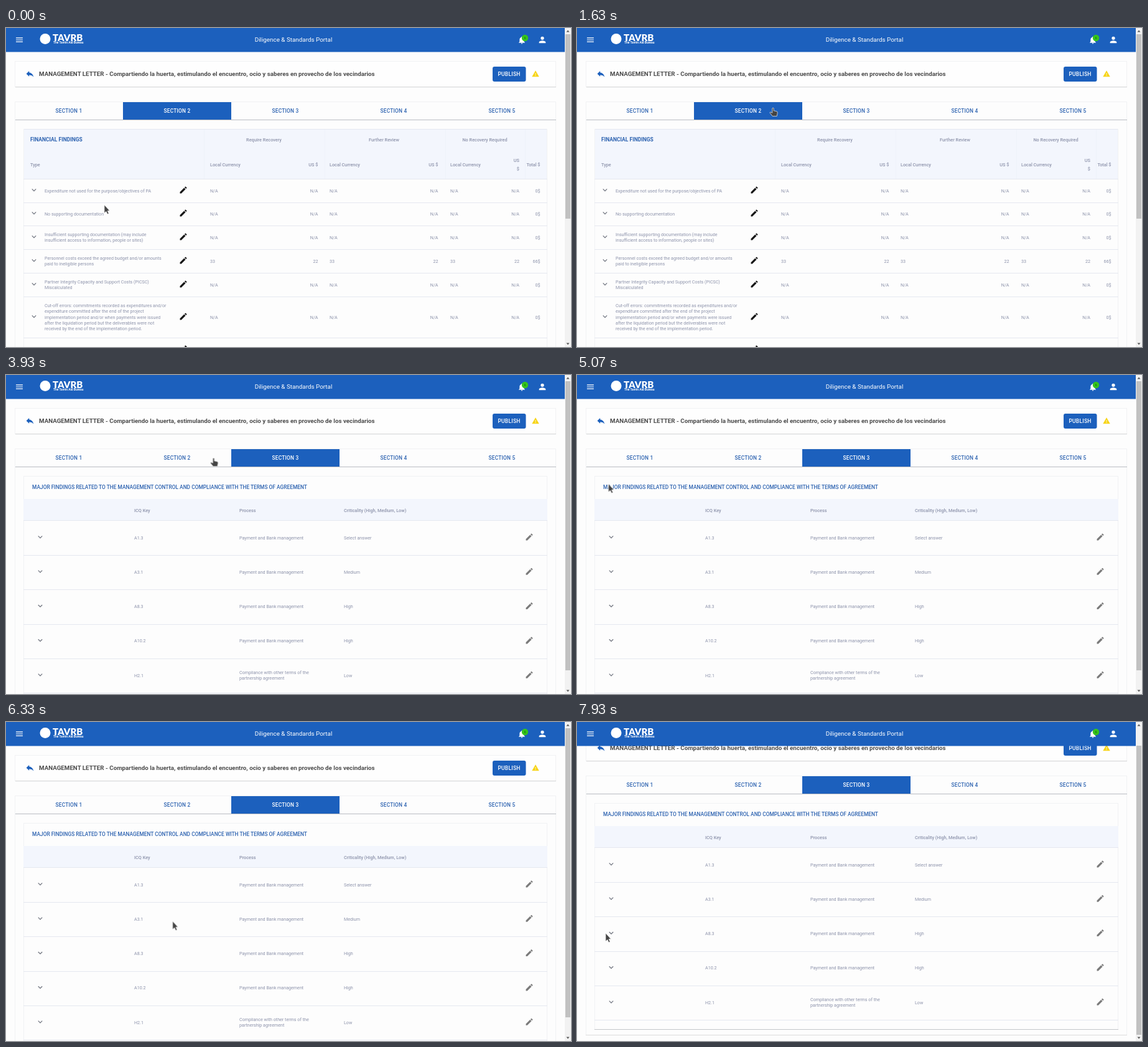
An HTML page for the animation above (8 s loop, 908x512 px).

```html
<!DOCTYPE html>
<html lang="en">
<head>
<meta charset="utf-8">
<title>Management letter</title>
<style>
html, body { margin: 0; width: 100%; height: 100%; overflow: hidden; background: #fdfdfd; }
svg { display: block; width: 908px; height: 512px; font-family: Roboto, sans-serif; }
.page, .thumb, .cursor, .ripple { animation: 8s linear infinite; }
.before, .after, .arrow, .hand, .pressed { animation: 8s step-end infinite; }
.page { animation-name: scroll; }
.thumb { animation-name: thumb; }
.cursor { animation-name: move; }
.before { animation-name: leave; }
.after { animation-name: enter; }
.arrow { animation-name: arrow; }
.hand { animation-name: hand; }
.pressed { animation-name: press; }
.ripple { animation-name: ripple; transform-origin: 412px 131px; }

@keyframes scroll {
  0%, 79.4% { transform: translateY(0); animation-timing-function: ease-in-out; }
  81.4%, 100% { transform: translateY(-32px); }
}
@keyframes thumb {
  0%, 79.4% { transform: translateY(0); animation-timing-function: ease-in-out; }
  81.4%, 100% { transform: translateY(28px); }
}
@keyframes leave { 0% { opacity: 1; } 38.75%, 100% { opacity: 0; } }
@keyframes enter { 0% { opacity: 0; } 38.75%, 100% { opacity: 1; } }
@keyframes arrow { 0% { opacity: 1; } 18.6% { opacity: 0; } 51%, 100% { opacity: 1; } }
@keyframes hand { 0% { opacity: 0; } 18.6% { opacity: 1; } 51%, 100% { opacity: 0; } }
@keyframes press { 0% { fill: #2c62b0; } 34%, 100% { fill: #1f5fd0; } }
@keyframes ripple {
  0%, 34% { transform: scale(0); }
  37.125% { transform: scale(.754); }
  40%, 100% { transform: scale(1); }
}
@keyframes move {
  0%, .375% { transform: translate(158px, 284px); }
  5% { transform: translate(118px, 330px); }
  10% { transform: translate(210px, 300px); }
  15% { transform: translate(280px, 200px); }
  19.2%, 21% { transform: translate(315px, 128px); }
  27.5%, 32.9% { transform: translate(340px, 130px); }
  34%, 43.4% { transform: translate(411px, 127px); }
  45.5% { transform: translate(425px, 131px); }
  49.125% { transform: translate(334px, 133px); }
  53.4% { transform: translate(205px, 160px); }
  58% { transform: translate(48px, 172px); }
  61% { transform: translate(72px, 186px); }
  64% { transform: translate(45px, 172px); }
  69% { transform: translate(345px, 168px); }
  74% { transform: translate(290px, 284px); }
  77.875% { transform: translate(269px, 318px); }
  82.875%, 85% { transform: translate(264px, 325px); }
  95.3% { transform: translate(82px, 346px); }
  97.3% { transform: translate(36px, 350px); }
  99.125%, 100% { transform: translate(46px, 339px); }
}
</style>
</head>
<body>
<svg id="stage" viewBox="0 0 908 512"></svg>
<script>
const BLUE = '#1c60bd', NAVY = '#2c62b0', LINE = '#e5e8f0', FAINT = '#f1f2f4', EDGE = '#dcdcdc';
const INK = '#8d93ab', ICON = '#70747f', HEAD = '#f3f6fd';
const CELL = 7.15, LABEL = 7.3;

const ICONS = {
  pencil: 'M3 17.25V21h3.75L17.81 9.94l-3.75-3.75zM20.71 7.04a1 1 0 0 0 0-1.41l-2.34-2.34a1 1 0 0 0-1.41 0l-1.83 1.83 3.75 3.75z',
  chevron: 'M16.59 8.59L12 13.17 7.41 8.59 6 10l6 6 6-6z',
  reply: 'M10 9V5l-7 7 7 7v-4.1c5 0 8.5 1.6 11 5.1-1-5-4-10-11-11z',
  warning: 'M1 21h22L12 2zm12-3h-2v-2h2zm0-4h-2v-4h2z',
  person: 'M12 12a4 4 0 1 0 0-8 4 4 0 0 0 0 8zm0 2c-2.67 0-8 1.34-8 4v2h16v-2c0-2.66-5.33-4-8-4z',
  bell: 'M12 22a2 2 0 0 0 2-2h-4a2 2 0 0 0 2 2zm6-6v-5c0-3.07-1.63-5.64-4.5-6.32V4a1.5 1.5 0 0 0-3 0v.68C7.64 5.36 6 7.92 6 11v5l-2 2v1h16v-1z',
  menu: 'M3 18h18v-2H3zm0-5h18v-2H3zm0-7v2h18V6z'
};

const rect = (x, y, w, h, fill, extra = '') =>
  `<rect x="${x}" y="${y}" width="${w}" height="${h}" fill="${fill}" ${extra}/>`;
const rule = (y, x1 = 28, x2 = 870, color = LINE) => rect(x1, y, x2 - x1, 1, color);
const post = (x, y1, y2, color = FAINT) => rect(x, y1, 1, y2 - y1, color);
const icon = (name, x, y, fill, size = 14.6) =>
  `<path d="${ICONS[name]}" fill="${fill}" transform="translate(${x - size / 2} ${y - size / 2}) scale(${size / 24})"/>`;

// y is the vertical middle of the capitals
const text = (x, y, s, { size = CELL, fill = INK, weight = 400, anchor = 'start', extra = '' } = {}) =>
  `<text x="${x}" y="${y + size * .355}" font-size="${size}" fill="${fill}" font-weight="${weight}" text-anchor="${anchor}" ${extra}>${s}</text>`;
const right = (x, y, s, style = {}) => text(x, y, s, { anchor: 'end', ...style });
const lines = (x, y, list) =>
  list.map((s, i) => text(x, y + (i - (list.length - 1) / 2) * 9.3, s)).join('');

const bold = { size: LABEL, weight: 500 };

function tabs(active) {
  return [1, 2, 3, 4, 5].map(n => {
    const on = n === active, mid = 101 + (n - 1) * 174;
    const pressed = active === 2 && n === 3;
    return (on ? rect(mid - 87, 119, 174, 28, BLUE) : '') +
      (pressed ? '<g clip-path="url(#tab)"><circle class="ripple" cx="412" cy="131" r="126" fill="#c6d5ed"/></g>' : '') +
      text(mid, 133, 'SECTION ' + n, {
        size: 8.4, weight: 500, anchor: 'middle', fill: on ? '#fff' : NAVY,
        extra: 'letter-spacing=".2"' + (pressed ? ' class="pressed"' : '')
      });
  }).join('');
}

function financial() {
  const rows = [
    [261, ['Expenditure not used for the purpose/objectives of PA']],
    [298, ['No supporting documentation']],
    [336, ['Insufficient supporting documentation (may include', 'insufficient access to information, people or sites)']],
    [374, ['Personnel costs exceed the agreed budget and/or amounts', 'paid to ineligible persons']],
    [412, ['Partner Integrity Capacity and Support Costs (PICSC)', 'Miscalculated']],
    [464, ['Cut-off errors: commitments recorded as expenditures and/or', 'expenditure committed after the end of the project',
      'implementation period and/or when payments were issued', 'after the liquidation period but the deliverables were not',
      'received by the end of the implementation period.']]
  ];
  const groups = [[328, 501.5, 414.5, 'Require Recovery'], [520, 694.5, 607.5, 'Further Review'], [714, 825, 769.5, 'No Recovery Required']];
  let out = rect(28, 162, 842, 81, HEAD) + rule(162) + post(28, 162, 512) + post(869, 162, 512) +
    [318, 512, 706, 834].map(x => post(x, 163, 243, '#eef2fa')).join('') +
    text(39, 179, 'FINANCIAL FINDINGS', { size: 8.5, weight: 700, fill: NAVY }) +
    text(39, 219, 'Type', bold) + right(858.5, 219, 'Total $', bold);
  groups.forEach(([l, r, mid, name], i) => {
    out += text(mid, 179, name, { ...bold, anchor: 'middle' }) + text(l, 219, 'Local Currency', bold);
    out += i < 2 ? right(r, 219, 'US $', bold) : right(r, 212, 'US', bold) + right(r, 226, '$', bold);
  });
  rows.forEach(([y, label], i) => {
    const paid = i === 3;
    out += icon('chevron', 45, y - 1, ICON) + lines(62, y, label) + icon('pencil', 285, y - 1, '#161616') +
      groups.map(([l, r]) => text(l, y, paid ? '33' : 'N/A') + right(r, y, paid ? '22' : 'N/A')).join('') +
      right(858.5, y, paid ? '66$' : '0$');
  });
  return out + [242, 280, 317, 355, 393, 431, 497].map(y => rule(y)).join('') + icon('pencil', 285, 515, '#161616');
}

function major() {
  const bank = ['Payment and Bank management'];
  const rows = [['A1.3', bank, 'Select answer'], ['A3.1', bank, 'Medium'], ['A8.3', bank, 'High'], ['A10.2', bank, 'High'],
    ['H2.1', ['Compliance with other terms of the', 'partnership agreement'], 'Low']];
  let out = rule(162, 28, 870, FAINT) + post(28, 162, 525) + post(869, 162, 525) + rect(28, 199, 842, 35, HEAD) +
    text(42, 180.5, 'MAJOR FINDINGS RELATED TO THE MANAGEMENT CONTROL AND COMPLIANCE WITH THE TERMS OF AGREEMENT',
      { size: 8.4, weight: 500, fill: NAVY }) +
    text(206, 217, 'ICQ Key', bold) + text(375, 217, 'Process', bold) +
    text(543, 217, 'Criticality (High, Medium, Low)', bold) + rule(233);
  rows.forEach(([key, process, level], i) => {
    const y = 261 + i * 55.3;
    out += icon('chevron', 55, y - 1, ICON) + text(206, y, key) + lines(375, y, process) +
      text(543, y, level) + icon('pencil', 841, y - 1, '#7b7b7b') + rule(Math.round(289 + i * 55.3));
  });
  return out + rule(525, 28, 870, '#c4c6ca');
}

const card = rect(14.5, 53.5, 869, 41, '#fefefe', `stroke="${FAINT}"`) + rule(94, 15, 884, EDGE) + rule(95, 15, 884, FAINT) +
  icon('reply', 38.5, 73.5, BLUE, 15.6) +
  text(53, 73.5, 'MANAGEMENT LETTER - Compartiendo la huerta, estimulando el encuentro, ocio y saberes en provecho de los vecindarios',
    { size: 9.78, weight: 700, fill: '#4c4c4c' }) +
  rect(782, 62, 53.5, 24, BLUE, 'rx="3"') +
  text(808.5, 74, 'PUBLISH', { size: 8.5, weight: 500, fill: '#fff', anchor: 'middle', extra: 'letter-spacing=".24"' }) +
  icon('warning', 851, 73.5, '#f7d417', 12.5);

const panel = post(14, 119, 535) + post(883, 119, 535) + rule(118, 14, 884, FAINT) + rule(534, 14, 884, EDGE);
const tabLine = rule(147, 15, 884, '#b9bcc2');

const header = rect(0, 0, 898, 38.5, BLUE) + icon('menu', 21.5, 19, '#fff') +
  '<circle cx="63" cy="17.5" r="8.5" fill="#fff"/>' +
  text(75, 15.8, 'TAVRB', { size: 15, weight: 900, fill: '#fff', extra: 'style="font-family:Lato,sans-serif"' }) +
  text(76, 23.3, 'The Tavrin Aid Bureau', { size: 4.9, weight: 700, fill: '#fff' }) +
  text(462, 19, 'Diligence &amp; Standards Portal', { size: 9.85, fill: '#fff', anchor: 'middle' }) +
  icon('bell', 829, 19.5, '#fff') + '<circle cx="834" cy="16" r="5.2" fill="#35c41c"/>' +
  text(834, 16, '6', { size: 5.5, fill: '#17640f', anchor: 'middle' }) + icon('person', 862, 19, '#fff', 16);

const thumb = h => rect(899, 10, 8, h, '#c1c1c1');
const scrollbar = rect(898, 0, 10, 512, '#f2f2f2') +
  '<path d="M900.5 6.5h5l-2.5-3zM900.5 505.5h5l-2.5 3z" fill="#5a5a5a"/>' +
  `<g class="before">${thumb(296)}</g><g class="after"><g class="thumb">${thumb(464)}</g></g>`;

const cursor = `<g class="cursor" fill="#444" stroke="#f4f4f4" stroke-width=".7">
  <path class="arrow" d="M0 0V13l3-2.6 2 4.4 2.2-1-2-4.3 3.3-.3z"/>
  <path class="hand" d="M-1.2.8q1.2-1.6 2.4 0v4l4.6 1q1.7.5 1.4 2.5l-1 5.2h-7l-4-5q-.8-1.6 1-1.5l2.6 1.2z"/></g>`;

document.getElementById('stage').innerHTML =
  '<defs><clipPath id="tab"><rect x="362" y="119" width="174" height="28"/></clipPath></defs>' +
  rect(0, 0, 908, 512, '#fdfdfd') +
  `<g class="page">${card}${panel}` +
  `<g class="before">${tabs(2)}${financial()}</g><g class="after">${tabs(3)}${major()}</g>${tabLine}</g>` +
  header + scrollbar + cursor;
</script>
</body>
</html>
```
